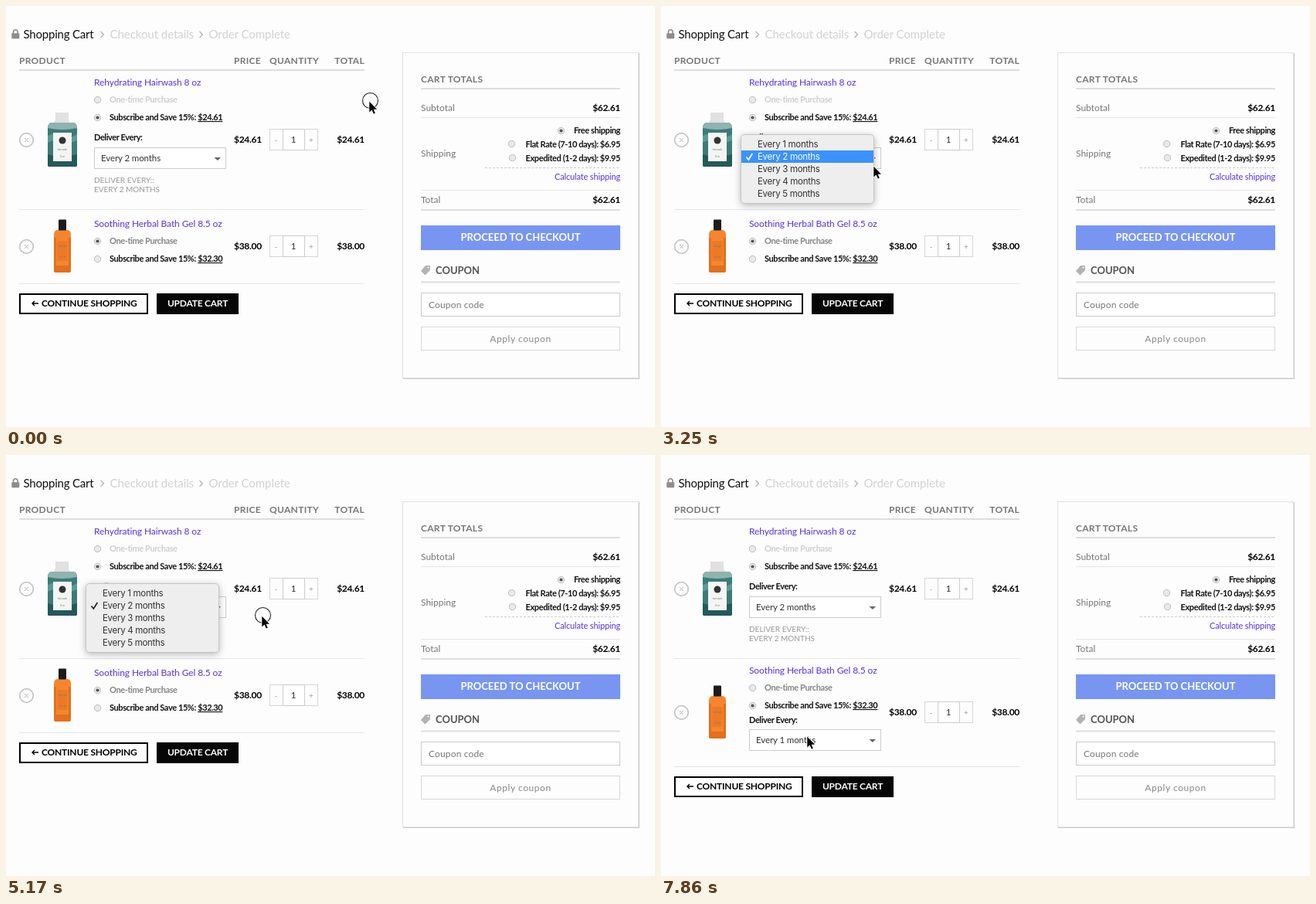
These frames come from a looping animation (840x545 px, 8000 ms). An HTML page:

```html
<!DOCTYPE html>
<html lang="en">
<head>
<meta charset="utf-8">
<title>Shopping cart</title>
<style>
  html, body { margin: 0; width: 100%; height: 100%; overflow: hidden; background: #fdfdfd; }
  svg { display: block; width: 840px; height: 545px; font-family: Lato, sans-serif; }
  text { font-size: 12px; fill: #777; }
  .crumb { font-size: 15px; letter-spacing: -.05px; fill: #d2d2d2; }
  .now { letter-spacing: -.2px; fill: #111; }
  .head { font-weight: 700; letter-spacing: .3px; }
  .link { fill: #5b31e2; letter-spacing: -.1px; }
  .small { font-size: 11px; letter-spacing: -.15px; }
  .opt { font-size: 11px; font-weight: 700; letter-spacing: -.4px; fill: #111; }
  .grey { fill: #858585; }
  .off { fill: #cfcfcf; }
  .price { font-weight: 700; letter-spacing: -.3px; fill: #000; }
  .under { text-decoration: underline; }
  .sel { font-size: 11.5px; letter-spacing: -.1px; fill: #333; }
  .note { font-size: 10px; fill: #999; }
  .btn { font-weight: 700; letter-spacing: -.22px; fill: #000; }
  .big { font-size: 13px; letter-spacing: 0; fill: #555; }
  .white { fill: #fff; }
  .hint { letter-spacing: .15px; fill: #777; }
  .apply { letter-spacing: .55px; fill: #888; }
  .end { text-anchor: end; }
  .mid { text-anchor: middle; }
  .box { fill: #fff; stroke: #ccc; }
  .thick { stroke: #dedede; stroke-width: 2; }
  .thin { stroke: #e6e6e6; }
  .dash { stroke: #ccc; stroke-dasharray: 3 2; }
  .card { fill: #fdfdfd; stroke: #e2e2e2; filter: drop-shadow(1px 1px .5px #ccc); }
  .tiny { font-size: 3px; text-anchor: middle; fill: #777; }
  .focus .box { filter: drop-shadow(0 0 2px #aaa); }
  #menu text { font: 11.5px Inter, sans-serif; letter-spacing: -.3px; fill: #333; }
  #menu .on text { fill: #fff; }
  #menu .on rect { fill: #3b92fb; }
  #menu .on path { stroke: #fff; }
  #panel { filter: drop-shadow(0 2px 5px rgba(0, 0, 0, .28)); }
  .hide { display: none; }
</style>
</head>
<body>
<svg id="stage" viewBox="0 0 840 545"></svg>
<script>
const text = (x, y, cls, s) => `<text x="${x}" y="${y}" class="${cls}">${s}</text>`;
const rect = (x, y, w, h, attrs) => `<rect x="${x}" y="${y}" width="${w}" height="${h}" ${attrs}/>`;
const line = (x1, x2, y, cls) => `<line x1="${x1}" x2="${x2}" y1="${y}" y2="${y}" class="${cls}"/>`;
const path = (d, attrs) => `<path d="${d}" ${attrs}/>`;
const group = (id, body) => `<g id="${id}">${body}</g>`;

const radio = (x, y, id = '', on = false) =>
  `<circle cx="${x}" cy="${y}" r="4.2" fill="#e9e9e9" stroke="#bdbdbd"/>` +
  `<circle id="${id}" cx="${x}" cy="${y}" r="2.1" fill="#555" class="${on ? '' : 'hide'}"/>`;

const select = (y, label) =>
  rect(114.5, y + .5, 170, 27, 'class="box"') +
  text(123, y + 18, 'sel', label) +
  path(`M269.5 ${y + 13}h8.6l-4.3 4z`, 'fill="#666"');

const subscribe = (y, cost) =>
  text(134, y, 'opt', `Subscribe and Save 15%: <tspan class="under">${cost}</tspan>`);

// Remove button, price, quantity and total, centred on y
const figures = (y, cost) =>
  `<circle cx="26.5" cy="${y + .5}" r="8.8" fill="none" stroke="#c6c6c6" stroke-width="1.8"/>` +
  path(`M24 ${y - 2}l5 5m0-5l-5 5`, 'stroke="#b5b5b5"') +
  text(295, y + 4, 'price', cost) + text(464, y + 4, 'price end', cost) +
  rect(341.5, y - 13.5, 62, 27, 'fill="#fdfdfd" stroke="#d6d6d6"') +
  rect(358.5, y - 13.5, 28, 27, 'class="box"') +
  text(349.5, y + 4, 'mid note', '-') + text(372, y + 4, 'mid sel', '1') +
  text(395, y + 4, 'mid note', '+');

const bottleA =
  path('M59 151h28q5 1 5 7v48q0 2-3 2H57q-3 0-3-2v-48q0-6 5-7z', 'fill="#3c7b78"') +
  path('M59 151h28q5 1 5 7-19 4-38 0 0-6 5-7z', 'fill="#8fb3ae"') +
  path('M54 168q10-5 19 0t19-2v8q-10 5-19 1t-19 2z', 'fill="#5a9a95"') +
  path('M54 192q18 6 38 0v14q0 2-3 2H57q-3 0-3-2z', 'fill="#24595a"') +
  path('M64 138h17v9l2 4H62l2-4z', 'fill="#e0e1e0"') +
  rect(61, 164, 24, 37, 'fill="#f3f5f2"') +
  '<circle cx="73" cy="174" r="4.5" fill="#333"/>' +
  text(73, 187, 'tiny', 'hair wash') + text(73, 196, 'tiny', '8 oz');

const bottleB =
  path('M66 290h14q4 1 4 6v46q0 3-3 3H65q-3 0-3-3v-46q0-5 4-6z', 'fill="#f5862f"') +
  path('M62 300h3v45q-3 0-3-3zM81 300h3v42q0 3-3 3z', 'fill="#e2701d"') +
  rect(68, 276.5, 10, 14, 'rx="1" fill="#1d1a19"') +
  rect(66, 304, 14, 26, 'fill="#ee7a24"') +
  path('M62 336h22v6q0 3-3 3H65q-3 0-3-3z', 'fill="#e2701d"') +
  text(73, 312, 'tiny', 'bath gel') + text(73, 326, 'tiny', '8.5 oz');

const crumbs =
  path('M9.5 36v-2.5a2.8 2.8 0 0 1 5.6 0V36', 'fill="none" stroke="#8d8d8d" stroke-width="1.6"') +
  rect(7.3, 35.3, 10, 7, 'rx="1" fill="#8d8d8d"') +
  text(22.5, 42, 'crumb now', 'Shopping Cart') +
  text(134.5, 42, 'crumb', 'Checkout details') + text(262.5, 42, 'crumb', 'Order Complete') +
  path('M122.5 33l4 4-4 4M250.5 33l4 4-4 4', 'fill="none" stroke="#b4b4b4" stroke-width="1.3"');

const heads = text(17, 75, 'head', 'PRODUCT') + text(295, 75, 'head', 'PRICE') +
  text(341, 75, 'head', 'QUANTITY') + text(464, 75, 'head end', 'TOTAL') +
  line(17, 464, 83, 'thick');

const rowA = bottleA + text(114, 103, 'link', 'Rehydrating Hairwash 8 oz') +
  radio(118.5, 121.5) + text(134, 125, 'opt off', 'One-time Purchase') +
  radio(118.5, 144.5, '', true) + subscribe(148, '$24.61') +
  group('deliver', text(114, 174, 'opt', 'Deliver Every:')) +
  group('select', select(183, 'Every 2 months')) +
  text(114, 229, 'note', 'DELIVER EVERY::') + text(114, 241, 'note', 'EVERY 2 MONTHS') +
  figures(173, '$24.61') + line(17, 464, 263.5, 'thin');

const rowB =
  group('optsB', text(114, 286, 'link', 'Soothing Herbal Bath Gel 8.5 oz') +
    radio(118.5, 304.5, 'once', true) + text(134, 308, 'opt grey', 'One-time Purchase') +
    radio(118.5, 327.5, 'sub') + subscribe(331, '$32.30')) +
  group('figsB', bottleB + figures(311, '$38.00')) +
  group('extraB', text(114, 347, 'opt', 'Deliver Every:') + select(355, 'Every 1 months'));

const footer = line(17, 464, 359.5, 'thin') +
  rect(18, 373, 165, 25, 'fill="#fff" stroke="#000" stroke-width="2"') +
  path('M42 385h-8m3-3l-3 3 3 3', 'fill="none" stroke="#000" stroke-width="1.4"') +
  text(46, 389, 'btn', 'CONTINUE SHOPPING') +
  rect(195, 372, 106, 27, 'fill="#060606"') +
  text(248, 389, 'btn mid white', 'UPDATE CART');

const totals =
  rect(513.5, 60.5, 305, 421, 'class="card"') +
  text(537, 99, 'head', 'CART TOTALS') + line(537, 795, 107, 'thick') +
  text(537, 136, '', 'Subtotal') + text(795, 136, 'price end', '$62.61') + line(537, 795, 144.5, 'thin') +
  text(537, 195, '', 'Shipping') +
  radio(718.5, 161.5, '', true) + text(795, 165, 'opt end', 'Free shipping') +
  radio(654.5, 178.5) + text(795, 183, 'opt end', 'Flat Rate (7-10 days): $6.95') +
  radio(655.5, 196.5) + text(795, 201, 'opt end', 'Expedited (1-2 days): $9.95') +
  line(620, 795, 209.5, 'dash') + text(795, 225, 'link small end', 'Calculate shipping') +
  line(537, 795, 238.5, 'thin') + text(537, 255, '', 'Total') +
  text(795, 255, 'price end', '$62.61') + line(537, 795, 264, 'thick') +
  rect(537, 284, 258, 32, 'fill="#7896f1"') +
  text(666, 304, 'btn big mid white', 'PROCEED TO CHECKOUT') +
  path('M543 336h6v6l-6.5 6.5-5.5-5.5z', 'fill="#b2b2b2"') +
  '<circle cx="546.5" cy="338.5" r="1.1" fill="#fdfdfd"/>' +
  text(556, 347, 'btn big', 'COUPON') + line(537, 795, 357.5, 'thick') +
  rect(537.5, 371.5, 257, 30, 'class="box"') +
  text(547, 391, 'hint', 'Coupon code') +
  rect(537.5, 415.5, 257, 30, 'fill="#fdfdfd" stroke="#d9d9d9"') +
  text(666, 435, 'mid apply', 'Apply coupon');

const items = [1, 2, 3, 4, 5].map(n => {
  const y = 155 + 16 * n;
  return `<g class="item">${rect(104, y, 171, 16, 'fill="none"')}${text(125, y + 12, '', `Every ${n} months`)}` +
    (n === 2 ? path(`M110.5 ${y + 8.5}l2.8 3.5 5-8`, 'fill="none" stroke="#222" stroke-width="1.7"') : '') + '</g>';
}).join('');
const menu = rect(103.5, 166.5, 172, 89, 'id="panel" rx="4.5" fill="#eee" stroke="#c4c4c4"') + items;

const pointer =
  group('ring', '<circle cx="1.5" cy="-.5" r="10" fill="none" stroke="#222" stroke-width="1.1"/>') +
  group('arrow', path('M.3.8V14.6L3.5 11.6 5.8 16.6 7.8 15.7 5.6 10.8H10Z',
    'fill="#000" stroke="#fff" stroke-width="1.4" paint-order="stroke"')) +
  group('hand', path('M-3.6 1.2C-3.6-.6-1-.8-.6 1L.4 5.5C1 4.2 3 4.4 3.2 6 4 5 5.8 5.4 6 7 6.8 6.2 9.1 6.6 ' +
    '8.9 8.8 9 12 7.4 13 7.2 16.5H-.6C-1 14-4.4 12.4-6 9.6-6.6 8-4.6 7.4-3.4 8.6L-2 10Z',
    'fill="#fff" stroke="#000" stroke-width="1.2" stroke-linejoin="round"') +
    path('M1.2 10.5v3.5m2.4-3.5v3.5m2.4-3.5v3.5', 'stroke="#000" stroke-width=".8"'));

const $ = id => document.getElementById(id);
$('stage').innerHTML = crumbs + heads + rowA + rowB + group('footer', footer) + totals +
  group('menu', menu) + group('pointer', pointer);

// Pointer stops: time, x, y, hand shape
const stops = [
  [0, 470, 123], [890, 462, 126], [1040, 438, 136], [1190, 408, 149], [1330, 374, 163],
  [1480, 347, 173, 1], [1630, 325, 180], [1780, 306, 185], [1920, 296, 187],
  [2070, 287, 190], [2210, 279, 193], [2360, 275, 194],
  [3250, 275, 207], [3400, 270, 222], [3550, 266, 240], [3690, 264, 250], [3840, 263, 253],
  [3990, 263, 232], [4140, 263, 204], [4290, 262, 182], [4730, 290, 192], [4880, 331, 208],
  [5320, 329, 211], [5470, 320, 223], [5620, 300, 243], [5770, 275, 264],
  [5910, 251, 279, 1], [6060, 222, 299], [6210, 202, 313], [6360, 194, 322], [6510, 190, 326],
  [7560, 150, 336], [7710, 119, 352], [7860, 189, 364]
];
// Highlighted menu item: time, number
const picks = [[0, 2], [3400, 3], [3550, 5], [3990, 4], [4140, 3], [4290, 2], [4430, 1], [4730, 0]];
const clicks = [0, 2650, 5170, 6810];

const at = (list, t) => list.filter(k => k[0] <= t).pop();
const show = (id, on) => $(id).classList.toggle('hide', !on);
const shift = (id, x, y) => $(id).setAttribute('transform', `translate(${x} ${y})`);
const rows = [...document.querySelectorAll('.item')];

function draw(t) {
  const [, x, y, hand] = at(stops, t);
  shift('pointer', x, y);
  show('hand', hand);
  show('arrow', !hand);
  show('ring', clicks.some(c => t >= c && t < c + 145));

  show('menu', t >= 2800 && t < 5320);
  const pick = at(picks, t)[1];
  rows.forEach((row, i) => row.classList.toggle('on', i + 1 === pick));
  $('deliver').setAttribute('opacity', t >= 5170 && t < 5320 ? .25 : 1);

  const open = t >= 6960;
  $('select').classList.toggle('focus', t >= 5320 && !open);
  show('once', !open);
  show('sub', open);
  show('extraB', open);
  shift('optsB', 0, open ? -3 : 0);
  shift('figsB', 0, open ? 22 : 0);
  shift('footer', 0, open ? 44 : 0);
}

const start = performance.now();
function tick() {
  draw((performance.now() - start) % 8000);
  requestAnimationFrame(tick);
}
tick();
</script>
</body>
</html>
```
